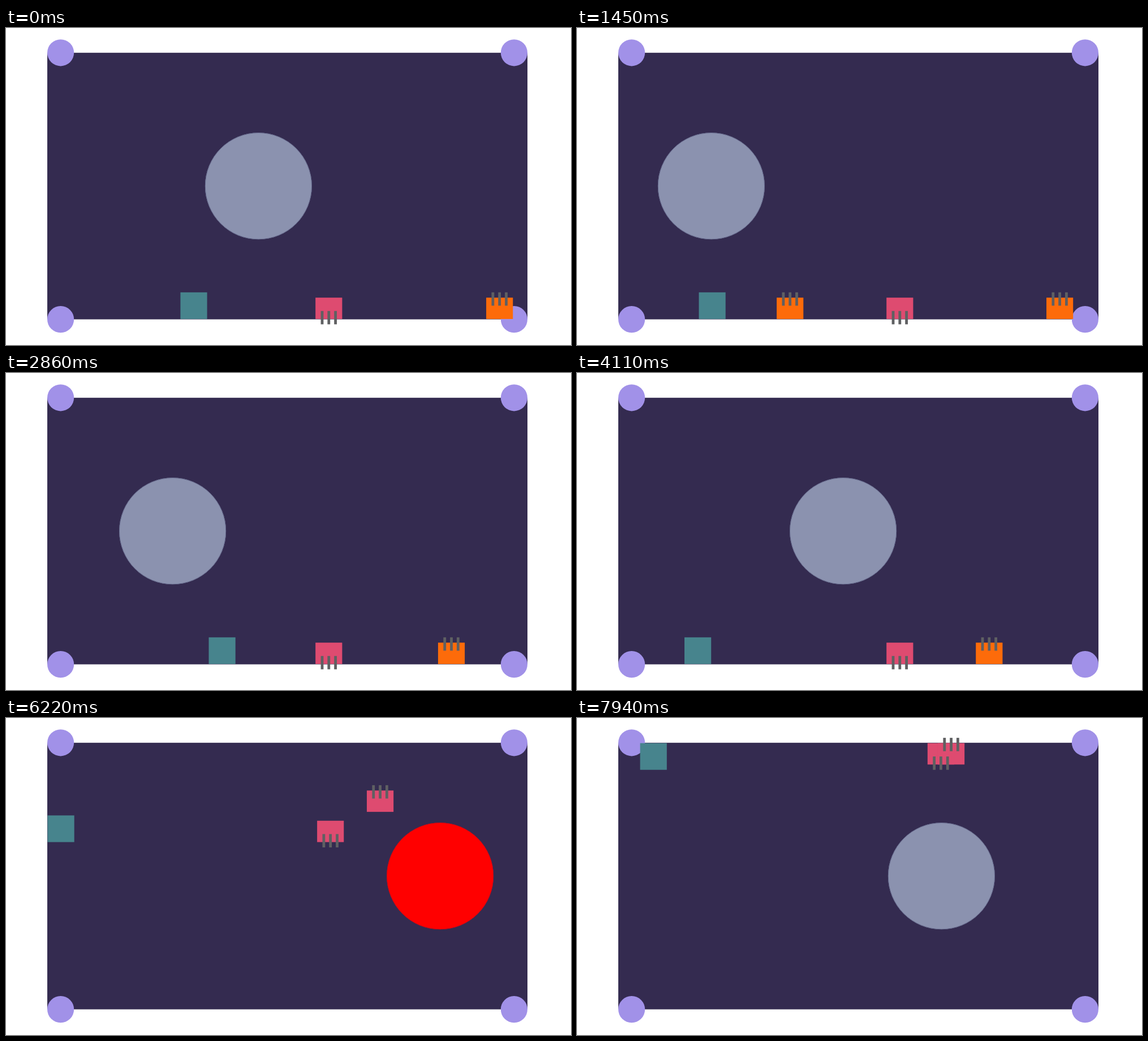
An HTML page with a canvas for the animation above (8000 ms loop, 999 by 561 pixels).

```html
<!DOCTYPE html>
<html>
<head>
<meta charset="utf-8">
<style>
html, body { margin: 0; height: 100%; overflow: hidden; background: #fff; }
canvas { display: block; }
</style>
</head>
<body>
<canvas id="stage" width="999" height="561"></canvas>
<script>
const ctx = document.getElementById('stage').getContext('2d');
const LOOP = 8000;
const ROOM = { left: 73, top: 43.8, right: 922, bottom: 515.6 };
const SIZE = 47.2, BODY = 37.8;
const FLOOR = 515, CEILING = 44.5;
const WALK = 3.67, HALF_GRAVITY = 1.405;
const FLIP = 65.5, HIT = 74;          // gravity reverses, then a walker strikes the moon
const COLORS = {
  room: '#342b50', corner: '#a191e8', player: '#47848d',
  moon: '#8b92af', rim: '#666a8d', hurt: '#ff0000',
  walker: '#fd6b0a', stunned: '#de4b70', spike: '#5f6062'
};

// Motion is stepped: eleven steps run between neighbouring marks.
const MARKS = [70, 900, 1770, 2630, 3490, 4340, 5210, 6070, 6930, 7790, 8650];
function stepAt(ms) {
  const t = ms + 10;
  if (t < MARKS[0]) return 0;
  const i = MARKS.findLastIndex(mark => mark <= t);
  return 1 + 11 * i + Math.floor(11 * (t - MARKS[i]) / (MARKS[i + 1] - MARKS[i]));
}

const drop = d => HALF_GRAVITY * Math.max(0, d) ** 2;

function along(path, n) {
  const i = path.findIndex(([at]) => at > n);
  if (i < 0) return path[path.length - 1][1];
  const [n0, x0] = path[i - 1], [n1, x1] = path[i];
  return x0 + (x1 - x0) * (n - n0) / (n1 - n0);
}

const PLAYER_PATH = [
  [0, 308.4], [9, 308.4], [17.5, 215.5], [21, 215.5], [35.5, 375], [37, 358.5],
  [52.4, 190], [55.4, 190], [66, 73.5], [84, 73.5], [94.7, 191.5], [102, 111.6]
];

function rect(x, y, w, h, color) {
  ctx.fillStyle = color;
  ctx.fillRect(x, y, w, h);
}

function disc(x, y, r, color) {
  ctx.fillStyle = color;
  ctx.beginPath();
  ctx.arc(x, y, r, 0, 2 * Math.PI);
  ctx.fill();
}

function drawRoom() {
  const { left, top, right, bottom } = ROOM;
  rect(left, top, right - left, bottom - top, COLORS.room);
  for (const x of [left + 23.6, right - 23.6])
    for (const y of [top, bottom]) disc(x, y, 23.6, COLORS.corner);
}

function drawMoon(n) {
  const x = 167 + 11 * Math.abs(n - 25.4 - 120 * Math.round((n - 25.4) / 120));
  disc(x, 279.7, 94.4, n >= HIT && n < 86 ? COLORS.hurt : COLORS.moon);
  ctx.strokeStyle = n >= HIT && n < 86 ? '#c40a18' : COLORS.rim;
  ctx.lineWidth = 1;
  ctx.beginPath();
  ctx.arc(x, 279.7, 94.1, 0, 2 * Math.PI);
  ctx.stroke();
}

function patrolWalker(n) {
  const x = 874.4 - WALK * Math.abs(Math.min(n, 65.6) - 6.9);
  const ground = FLOOR - BODY;
  if (n < HIT) return { x, y: ground - drop(n - FLIP), color: COLORS.walker };
  const d = n - HIT;
  const y = ground - drop(HIT - FLIP) - 32.8 * d - drop(d);
  return { x: x - Math.min(21, WALK * d), y: Math.max(CEILING, y), color: COLORS.stunned };
}

function stunnedWalker(n) {
  const nudge = Math.min(2.9, WALK * Math.max(0, n - FLIP));
  return {
    x: 547.2 + nudge + WALK * Math.max(0, n - 83),
    y: Math.max(CEILING, FLOOR - BODY - drop(n - FLIP)),
    color: COLORS.stunned, inverted: true
  };
}

function spawnedWalker(n) {
  return {
    x: 351.6 + WALK * Math.max(0, n - 18.6),
    y: Math.min(FLOOR - BODY, 265.8 + drop(n - 6.4)),
    color: COLORS.walker
  };
}

function drawWalkers(n) {
  const walkers = [stunnedWalker(n), patrolWalker(n)];
  if (n >= 7 && n < 35) walkers.push(spawnedWalker(n));
  for (const { x, y, color } of walkers) rect(x, y, SIZE, BODY, color);
  for (const { x, y, inverted } of walkers)
    for (const dx of [9.4, 21.2, 33])
      rect(x + dx, inverted ? y + 23.6 : y - 9.4, 4.8, 23.6, COLORS.spike);
}

function drawPlayer(n) {
  const y = Math.max(CEILING, FLOOR - SIZE - drop(n - FLIP));
  rect(along(PLAYER_PATH, n), y, SIZE, SIZE, COLORS.player);
}

function render(now) {
  const n = stepAt(now % LOOP);
  ctx.clearRect(0, 0, 999, 561);
  drawRoom();
  drawMoon(n);
  drawWalkers(n);
  drawPlayer(n);
}

const start = performance.now();
function tick() {
  render(performance.now() - start);
  requestAnimationFrame(tick);
}
tick();
</script>
</body>
</html>
```
